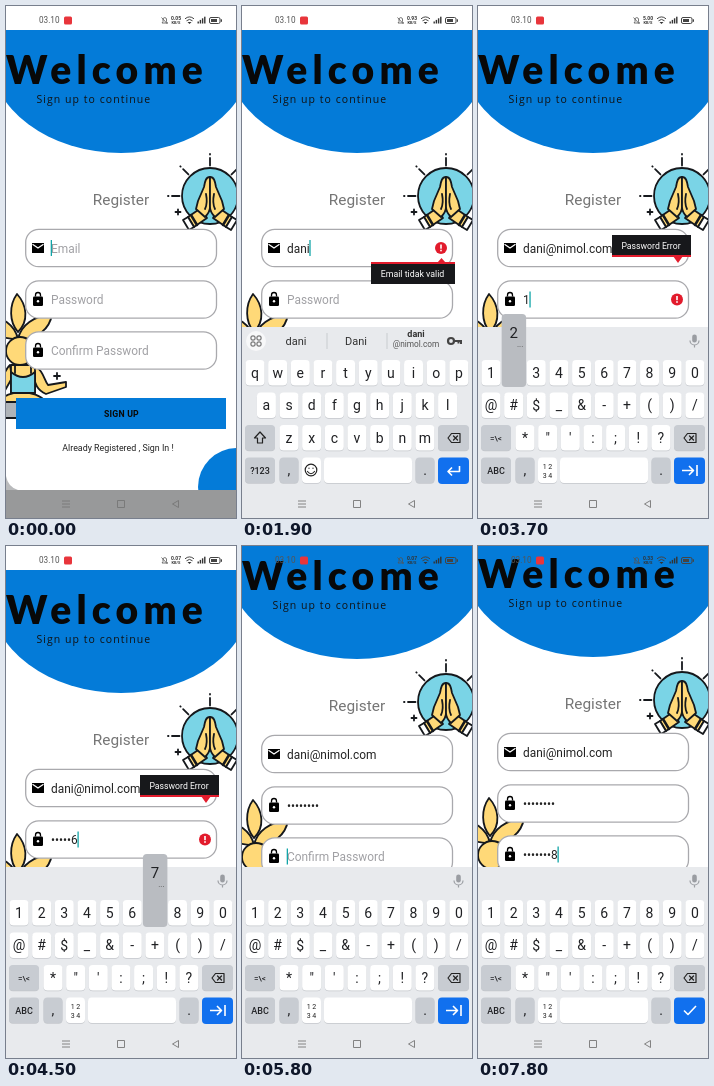
An HTML page for the animation above (8 s loop, 230x512 px).

```html
<!DOCTYPE html>
<html lang="id">
<head>
<meta charset="utf-8">
<title>Register form</title>
<style>
  html, body { margin: 0; width: 230px; height: 512px; overflow: hidden; background: #fff; }
  svg { display: block; font-family: Roboto, sans-serif; }
  .line { fill: none; stroke: #222; stroke-width: 1.2; stroke-linecap: round; stroke-linejoin: round; }
  .art { stroke: #15181c; stroke-width: 1.8; stroke-linejoin: round; stroke-linecap: round; }
</style>
</head>
<body>
<svg id="stage" width="230" height="512" viewBox="0 0 230 512"></svg>
<script>
const LOOP = 8000;
const BLUE = '#047bd8', ENTER = '#1170ee', PANEL = '#e8eaed', SKIN = '#ffd978', SKY = '#7ad4e6';
const NAME = 'dani', HOST = '@nimol.com';

// ---------- drawing helpers ----------
const rect = (x, y, w, h, fill, r = 0, more = '') =>
  `<rect x="${x}" y="${y}" width="${w}" height="${h}" rx="${r}" fill="${fill}" ${more}/>`;
const text = (s, x, y, size, fill = '#222', more = '') =>
  `<text x="${x}" y="${y}" font-size="${size}" fill="${fill}" ${more}>${s}</text>`;
const path = (d, fill = 'none', more = '') => `<path d="${d}" fill="${fill}" ${more}/>`;
const group = (id, body, more = '') => `<g id="${id}" ${more}>${body}</g>`;
const MID = 'text-anchor="middle"';
const esc = s => s.replace('&', '&amp;').replace('<', '&lt;');

// ---------- page ----------
function prayer() {
  const rays = [-90, -45, 0, 45].map(a =>
    `<path d="M204 159.500V152M204 148.500V148" transform="rotate(${a} 204 190)"/>`).join('');
  const half =
    path('M195 202L182 211L188 221L201 212Z', SKIN) +
    path('M182 211L177 214L183 224L188 221Z', '#fff') +
    path('M185 209L191 219', 'none', 'stroke-width="2.500"') +
    path('M204 171C200 171 199 175 198 181L192 195L190 203L199 211C202 208 204 205 204 201Z', SKIN) +
    path('M199 203C201 199 201 193 200 188');
  return `<g class="art"><circle cx="204" cy="190" r="28" fill="${SKY}"/>${rays}
    <path d="M169.500 206H174.500M172 203.500V208.500"/>
    ${half}<g transform="translate(408 0) scale(-1 1)">${half}</g></g>`;
}

function yogi() {
  return '<g class="art">' +
    path('M12 326C3 316 3 299 11 288C21 299 23 315 12 326Z', SKIN) +
    path('M12 333C15 319 28 310 46 308C44 322 32 334 12 333Z', SKIN) +
    path('M12 333C9 319 -4 310 -22 308C-20 322 -8 334 12 333Z', SKIN) +
    rect(-6, 396, 18, 16, '#aeb3b8') +
    path('M-6 396C0 383 30 383 40 396Z', SKIN) +
    path('M28 360C37 363 38 374 42 379L60 376V381L40 388C31 384 29 378 28 370Z', SKIN) +
    path('M4 359C-2 364 -4 376 -9 382L-3 388L6 372Z', SKIN) +
    path('M5 359H29V387H5Z', SKIN) +
    path('M5 366Q17 376 29 366V387H5Z', SKY) +
    path('M9 359V367M25 359V367M51 367V373M48 370H54') +
    `<circle cx="14" cy="345" r="14" fill="${SKIN}"/></g>`;
}

const mail = y => path(`M26 ${y - 5}H38V${y + 5}H26Z`, '#000') +
  path(`M26.500 ${y - 3.700}L32 ${y}L37.500 ${y - 3.700}`, 'none', 'stroke="#fff" stroke-width="1.2"');
const lock = y => rect(27, y - 3, 10, 9.500, '#000', 1.200) +
  path(`M29.500 ${y - 3}V${y - 4.500}A2.500 2.500 0 0 1 34.500 ${y - 4.500}V${y - 3}`, 'none', 'stroke="#000" stroke-width="1.3"') +
  `<circle cx="32" cy="${y + 1.700}" r="1.200" fill="#fff"/>`;

const FIELDS = [
  { y: 242, hint: 'Email', icon: mail },
  { y: 293.500, hint: 'Password', icon: lock },
  { y: 344.500, hint: 'Confirm Password', icon: lock }
];
const field = (f, i) =>
  rect(19.700, f.y - 18.700, 190.800, 37.400, '#fff', 13, 'stroke="#a9a9ad" stroke-width="1.3"') +
  f.icon(f.y) + text('', 45, f.y + 4.500, 11.900, '#222', `id="in${i}"`);

const badge = y => `<circle cx="199" cy="${y}" r="6" fill="#e21b2c"/>` +
  rect(198.200, y - 3.500, 1.600, 4.200, '#fff') + rect(198.200, y + 1.700, 1.600, 1.600, '#fff');

const mailError = group('mailError', badge(242) +
  path('M195 257L199.500 252L204 257Z', '#e21b2c') + rect(129, 256, 84, 2.500, '#e21b2c') +
  rect(129, 258, 84, 20, '#17181b') + text('Email tidak valid', 170.500, 271, 8.800, '#fff', MID));
const passError = group('passError', badge(293.500) +
  path('M195 250L200 257L205 250Z', '#e21b2c') + rect(134, 248.500, 79, 2.500, '#e21b2c') +
  rect(134, 229, 79, 20, '#17181b') + text('Password Error', 173, 242.500, 8.700, '#fff', MID));

const page = group('page',
  rect(0, 0, 230, 530, '#fff') +
  `<ellipse cx="115" cy="49" rx="131" ry="98" fill="${BLUE}"/>` + rect(0, -40, 230, 64, '#fff') +
  text('Welcome', 0, 77.500, 39, '#080808', 'font-family="Lato, sans-serif" font-weight="900" letter-spacing="5.2"') +
  text('Sign up to continue', 30.500, 97, 10.500, '#111', 'font-family="Open Sans, sans-serif" letter-spacing="1.05"') +
  prayer() + yogi() +
  `<circle cx="231" cy="481" r="39" fill="${BLUE}"/>` + path('M0 470Q2 481 12 484H0Z', '#b9babc') +
  text('Register', 115, 199, 15.400, '#757575', MID) +
  FIELDS.map(field).join('') + rect(45, 234, 1.300, 16, '#12a5a8', 0, 'id="caret"') +
  mailError + passError +
  rect(10, 392, 210, 31, BLUE) +
  text('SIGN UP', 115.500, 411, 8.700, '#0a0a0a', MID + ' font-weight="700" letter-spacing=".2"') +
  text('Already Registered , Sign In !', 112, 445, 8.900, '#222', MID));

// ---------- status and navigation bars ----------
const status = text('03.10', 33, 17, 8.200, '#555') +
  rect(58, 10.500, 8, 8, '#e8353b', 1.500) +
  path('M156 17H161.500L160.500 15.500V13A1.800 1.800 0 0 0 157 13V15.500ZM155.500 11.500L161.500 18', 'none', 'stroke="#555" stroke-width=".8"') +
  text('', 170, 13.500, 5, '#333', MID + ' font-weight="700" id="speed"') +
  text('KB/S', 170, 17.700, 3.900, '#333', MID + ' font-weight="700"') +
  path('M179 12.800Q183.500 9 188 12.800M180.500 14.800Q183.500 12 186.500 14.800', 'none', 'stroke="#444"') +
  path('M181.500 16L183.500 18L185.500 16Z', '#333') +
  [0, 1, 2, 3].map(i => rect(191.500 + i * 2.200, 15.500 - i * 1.600, 1.400, 2 + i * 1.600, '#333')).join('') +
  rect(203.500, 11.500, 10.500, 6, 'none', 1.500, 'stroke="#444"') +
  rect(205, 13, 6, 3, '#444') + rect(214.800, 13.300, 1.200, 2.500, '#444');

const nav = rect(0, 484, 230, 28, PANEL, 0, 'id="navBack"') +
  path('M56 495H64M56 498H64M56 501H64M111.500 494.500H118.500V501.500H111.500ZM172.500 494.500V501.500L166.500 498Z',
    'none', 'stroke="#777" stroke-width=".9"');

// ---------- keyboard ----------
const STEP = 22.65, ROW_Y = [367, 399.500, 432, 464.500];
const keyPos = {};
const key = (label, cx, cy, w = 19, fill = '#fff', size = 14) =>
  rect(cx - w / 2, cy - 12.200, w, 25.500, '#c3c6cb', 4) + rect(cx - w / 2, cy - 13, w, 25.500, fill, 4) +
  text(esc(label), cx, cy + size * .35, size, '#202124', MID + (size < 10 ? ' font-weight="500"' : ''));

function keyRow(chars, x, row) {
  return [...chars].map((c, i) => {
    const cx = x + i * STEP;
    keyPos[c] = { x: cx, y: ROW_Y[row] };
    return key(c, cx, ROW_Y[row]);
  }).join('');
}

function layout(id, rows, mode) {
  const grey = '#c8ccd2', num = mode === 'num', wide = mode === 'pass';
  const shift = num ? key('=\\<', 18, 432, 30, grey, 8) :
    key('', 18, 432, 30, grey) + path('M18 426L12.500 432H15.500V437H20.500V432H23.500Z', 'none', 'class="line"');
  let extra = '';
  if (num) extra = key('', 69.500, 464.500) + text('1 2', 69.500, 463, 7, '#222', MID) + text('3 4', 69.500, 471.500, 7, '#222', MID);
  if (mode === 'mail') extra = key('', 69.500, 464.500) +
    '<circle class="line" cx="69" cy="464" r="5.800"/><path class="line" d="M65.500 465.500Q69 470 72.500 465.500M67 462V462.300M71 462V462.300"/>';
  return group(id,
    keyRow(rows[0], 13, 0) + keyRow(rows[1], num ? 13 : 24.400, 1) + keyRow(rows[2], 47, 2) + shift +
    key('', 211.500, 432, 31, grey) +
    path('M206 432L209.500 427.500H218V436.500H209.500ZM211.500 430L215.500 434M215.500 430L211.500 434', 'none', 'class="line"') +
    key(num ? 'ABC' : '?123', 18, 464.500, 30, grey, 9) + key(',', 47, 464.500, 19, grey) +
    extra + (wide ? key('', 114.500, 464.500, 111) : key('', 126, 464.500, 88)) + key('.', 183, 464.500, 19, grey));
}

const enter = rect(196, 451.500, 31, 26.500, ENTER, 4) +
  path('', 'none', 'id="enterIcon" stroke="#fff" stroke-width="1.6" stroke-linejoin="round"');
const ICONS = {
  mail: 'M217.500 460V465.500H206M210 461.500L206 465.500L210 469.500',
  tab: 'M204 464.500H215M211 460L215.500 464.500L211 469M219 459V470',
  done: 'M206 464.500L210 468.500L218 460'
};

const passKey = (x, y) => path(`M${x + 4} ${y}H${x + 10}V${y + 3}M${x + 7.500} ${y}V${y + 2.500}`, 'none', 'stroke="#444" stroke-width="2"') +
  `<circle cx="${x}" cy="${y}" r="3" fill="none" stroke="#444" stroke-width="2.200"/>`;
const dots = [[11, 332], [17, 332], [11, 338], [17, 338]].map(([x, y]) =>
  rect(x - 2, y - 2, 4, 4, 'none', 1, 'stroke="#555"')).join('');
const word = (id, x, y, size, more = '') => text('', x, y, size, '#333', `${MID} id="${id}" ${more}`);

const strips =
  group('stripMail', '<circle cx="14" cy="335" r="10" fill="#f7f8f9"/>' + dots + passKey(209, 335) +
    group('words', word('w0', 54, 339, 11) + word('w1', 114, 339, 11) +
      word('w2', 174, 331, 9, 'font-weight="700"') + text(HOST, 174, 341, 8.300, '#555', MID) +
      rect(84.500, 327, 1, 16, '#c8ccd0') + rect(144.500, 327, 1, 16, '#c8ccd0'))) +
  rect(148, 324, 52, 20, '#000', 4, 'id="tap" opacity=".12"') +
  group('stripPass',
    group('chip', rect(76.500, 325, 49.500, 21, '#f8f9fa', 5) + passKey(84, 335.500) + text('Sandi', 96.500, 338.500, 8.800)) +
    rect(214.200, 328.500, 4.600, 8, '#9a9da2', 2.300) +
    path('M212 334.500A4.500 4.500 0 0 0 221 334.500M216.500 339V341.500', 'none', 'stroke="#9a9da2" stroke-width="1.2"'));

const board = group('board', rect(0, 321, 230, 170, PANEL) + strips +
  layout('mail', ['qwertyuiop', 'asdfghjkl', 'zxcvbnm'], 'mail') +
  layout('pass', ['qwertyuiop', 'asdfghjkl', 'zxcvbnm'], 'pass') +
  layout('num', ['1234567890', '@#$_&-+()/', '*"\':;!?'], 'num') +
  rect(3, 451.500, 30, 26, '#000', 4, 'id="modeTap" opacity=".15"') + enter);

const popup = group('popup', rect(-12, -59, 24.500, 73, '#b9bcc1', 4) +
  text('', 0, -35, 15, '#202124', MID + ' id="popChar"') +
  text('...', 6.500, -26, 8, '#444', MID + ' id="popMore"'));

document.getElementById('stage').innerHTML = page + board + popup + nav + status;

// ---------- timeline ----------
const $ = Object.fromEntries([...document.querySelectorAll('[id]')].map(e => [e.id, e]));
const PASS = [3600, 3800, 4000, 4200, 4400, 4500, 4600, 5200];
const CONFIRM = [6500, 6700, 7000, 7100, 7300, 7500, 7600, 7800];
const LETTERS = [1100, 1200, 1300, 1400];
const CARET = [[0, 1], [1600, 0], [1900, 1], [3100, 0], [3300, 1], [4800, 0], [4900, 1]];
const FOCUS = [[0, 0], [2700, 1], [5700, 2]];
const SPEED = [[0, '0.05'], [500, '0.93'], [2300, '5.00'], [4000, '0.07'], [6000, '0.33']];
const BOARD = [[0, 'mail'], [2800, 'pass'], [3300, 'num']];
const ENTERS = [[0, 'mail'], [2800, 'tab'], [5900, 'done']];
const POPS = [
  ...LETTERS.map((t, i) => [t - 100, NAME[i]]),
  ...PASS.map((t, i) => [t - 100, String(i + 1)]),
  ...CONFIRM.map((t, i) => [t - (i === 7 ? 200 : 100), String(i + 1)])
];

const at = (table, t) => table.filter(s => s[0] <= t).pop()[1];
const count = (times, t) => times.filter(s => s <= t).length;
const show = (el, on) => { el.style.display = on ? '' : 'none'; };
const ramp = (t, a, b) => { const p = Math.min(1, Math.max(0, (t - a) / (b - a))); return p * p * (3 - 2 * p); };
const masked = (n, all) => n ? '•'.repeat(all ? n : n - 1) + (all ? '' : n) : '';

function draw(t) {
  const pan = -34 * ramp(t, 5640, 5800) - 2 * ramp(t, 5900, 6100);
  $.page.setAttribute('transform', `translate(0 ${pan})`);

  const typed = NAME.slice(0, count(LETTERS, t));
  const values = [
    t >= 2200 ? NAME + HOST : typed,
    masked(count(PASS, t), t >= 5700),
    masked(count(CONFIRM, t))
  ];
  values.forEach((v, i) => {
    $['in' + i].textContent = v || FIELDS[i].hint;
    $['in' + i].setAttribute('fill', v ? '#222' : '#a0a0a4');
  });

  const focus = at(FOCUS, t);
  const width = values[focus] ? $['in' + focus].getComputedTextLength() : 0;
  $.caret.setAttribute('x', 44.700 + width);
  $.caret.setAttribute('y', FIELDS[focus].y - 8);
  show($.caret, at(CARET, t));
  show($.mailError, t >= 1100 && t < 2300);
  show($.passError, t >= 3600 && t < 5200);

  const mode = at(BOARD, t);
  $.board.setAttribute('transform', `translate(0 ${170 * (1 - ramp(t, 100, 500))})`);
  show($.board, t >= 100);
  $.navBack.setAttribute('fill', t < 100 ? '#98999a' : PANEL);
  for (const m of ['mail', 'pass', 'num']) show($[m], m === mode);
  show($.stripMail, mode === 'mail');
  show($.stripPass, mode !== 'mail');
  show($.chip, mode === 'pass');
  show($.words, typed && t < 2300);
  show($.tap, t >= 2100 && t < 2200);
  show($.modeTap, t >= 3200 && t < 3300);
  $.w0.textContent = $.w2.textContent = typed;
  $.w1.textContent = typed.charAt(0).toUpperCase() + typed.slice(1);
  $.enterIcon.setAttribute('d', ICONS[at(ENTERS, t)]);

  const pop = POPS.find(p => t >= p[0] && t < p[0] + 100);
  show($.popup, pop);
  if (pop) {
    const { x, y } = keyPos[pop[1]];
    $.popup.setAttribute('transform', `translate(${x} ${y})`);
    $.popChar.textContent = pop[1];
    show($.popMore, pop[1] >= '0' && pop[1] <= '9');
  }
  $.speed.textContent = at(SPEED, t);
}

function tick() {
  draw(performance.now() % LOOP);
  requestAnimationFrame(tick);
}
tick();
</script>
</body>
</html>
```
